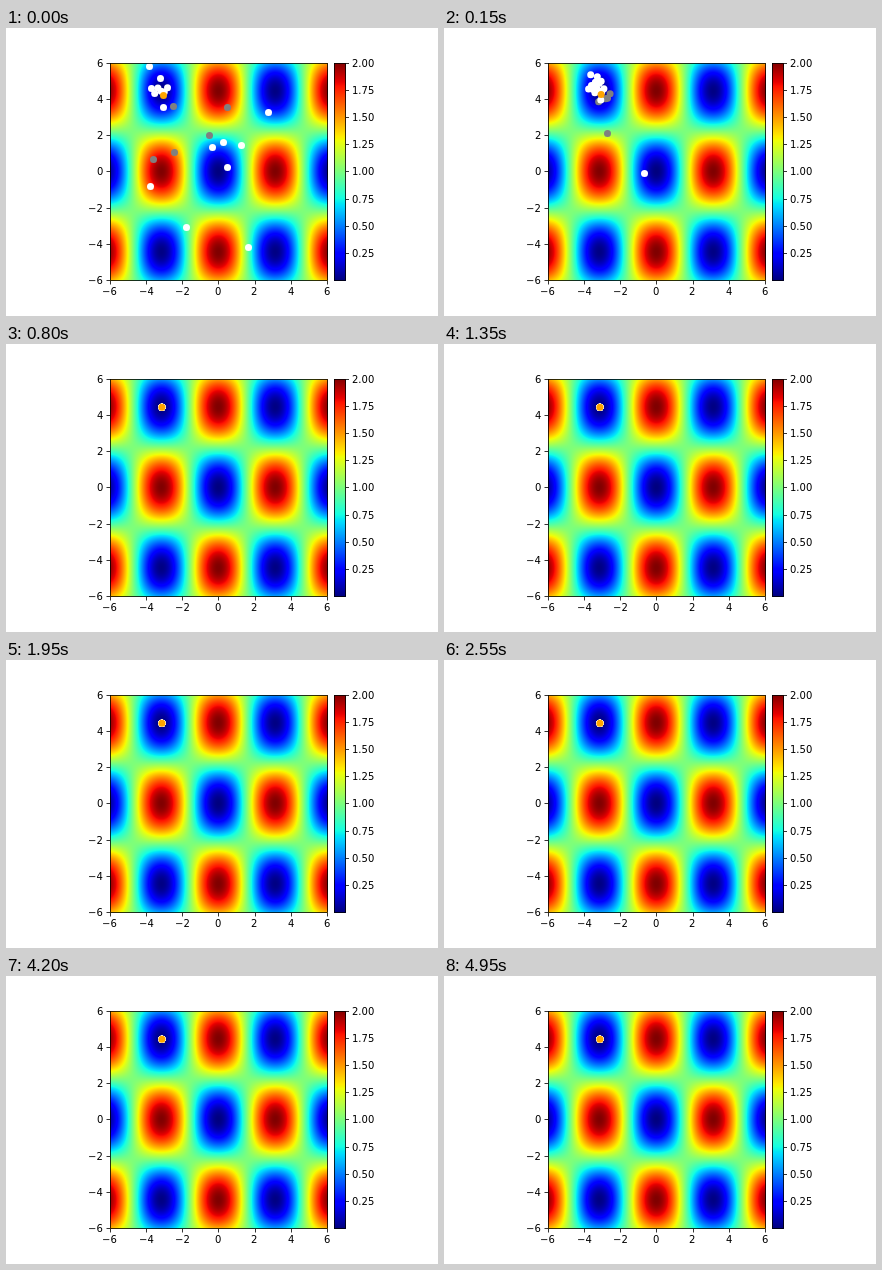
Recreate the animation shown at these times as an HTML page with a canvas. Size 432 px wide and 288 px high, loop 5000 ms.

```html
<!DOCTYPE html>
<html lang="en">
<head>
<meta charset="utf-8">
<title>Swarm search</title>
<style>
html, body { margin: 0; width: 100%; height: 100%; overflow: hidden; background: #fff; }
canvas { display: block; }
</style>
</head>
<body>
<canvas id="stage" width="432" height="288"></canvas>
<script>
const LOOP = 5000, STEP = 50, LAST = 16;
const SIZE = 217.44, UNIT = SIZE / 12, LEFT = 103.64, BASE = 252, TOP = 2.003;
const BOX = { x: 104, y: 35, w: 217, h: 217 };
const BAR = { x: 328, y: 35, w: 11, h: 217 };
const px = x => LEFT + (x + 6) * UNIT;
const py = y => BASE - (y + 6) * UNIT;
const barY = v => BASE - v / TOP * SIZE;
const GOAL = [px(-Math.PI), py(Math.PI * Math.SQRT2)];

// Starting points, grouped by how the agents travel.
const greys = [[167, 78], [221, 79], [203, 107], [147, 131]];
const far = [
  [262, 84], [206, 119], [217, 114], [235, 117],
  [144, 158], [180, 199], [242, 219]
];
const near = [[143, 38], [154, 50], [157, 79]];
for (let i = 0; i < 6; i++) near.push([145 + 3.2 * i, 62 + 3 * Math.sin(2.4 * i - 0.7)]);
const lateGrey = { from: [168, 124], via: [163, 105] };
const lateWhite = { from: [221, 139], via: [200, 145] };

const makeCanvas = () => Object.assign(document.createElement('canvas'), { width: 432, height: 288 });
const ctx = document.getElementById('stage').getContext('2d');
const plot = makeCanvas();
const pc = plot.getContext('2d');

const clamp = v => Math.min(1, Math.max(0, v));
const mix = (a, b, k) => a.map((v, i) => v + (b[i] - v) * k);

// Rises from a to b, stays full until c, falls to zero at d.
const hump = (v, a, b, c, d) => 255 * clamp(Math.min((v - a) / (b - a), (d - v) / (d - c)));
const jet = v => [
  hump(v, 0.35, 0.66, 0.89, 1.11),
  hump(v, 0.125, 0.375, 0.64, 0.91),
  hump(v, -0.11, 0.11, 0.34, 0.65)
];

const surface = (x, y) =>
  1 + (x * x + y * y) / 4000 - Math.cos(x) * Math.cos(y / Math.SQRT2);

function shade({ x: left, y: top, w, h }, value) {
  const img = pc.createImageData(w + 1, h + 1);
  let i = 0;
  for (let y = 0; y <= h; y++) {
    for (let x = 0; x <= w; x++) {
      const v = value(left + x + 0.5, top + y + 0.5) / TOP;
      for (const c of [...jet(clamp(v)), 255]) img.data[i++] = c;
    }
  }
  pc.putImageData(img, left, top);
}

function frame(c, { x, y, w, h }) {
  c.strokeStyle = '#000';
  c.lineWidth = 0.8;
  c.strokeRect(x + 0.5, y + 0.5, w, h);
}

function line(x1, y1, x2, y2) {
  pc.beginPath();
  pc.moveTo(x1, y1);
  pc.lineTo(x2, y2);
  pc.stroke();
}

// anchor: 0 left, 0.5 centre, 1 right; glyphs start on whole pixels.
function label(text, x, y, anchor) {
  pc.fillText(text, Math.round(x - pc.measureText(text).width * anchor), y);
}

function drawPlot() {
  pc.fillStyle = '#fff';
  pc.fillRect(0, 0, 432, 288);
  shade(BOX, (x, y) => surface((x - LEFT) / UNIT - 6, (BASE - y) / UNIT - 6));
  shade(BAR, (x, y) => (BASE - y) / SIZE * TOP);
  frame(pc, BAR);

  pc.fillStyle = '#000';
  pc.font = '10px "DejaVu Sans", sans-serif';
  for (let v = -6; v <= 6; v += 2) {
    const x = Math.round(px(v)) + 0.5, y = Math.round(py(v)) + 0.5;
    const text = String(v).replace('-', '\u2212');
    line(x, 253, x, 256.5);
    label(text, px(v), 267, 0.5);
    line(100.5, y, 104, y);
    label(text, 97, y + 3.5, 1);
  }
  for (let v = 0.25; v <= 2; v += 0.25) {
    const y = Math.round(barY(v)) + 0.5;
    line(340, y, 343, y);
    label(v.toFixed(2), 346, y + 3.5, 0);
  }
}

const toGoal = (p, k) => mix(GOAL, p, k);
const glide = (p, s) => {
  const lag = 2.5 + 2 * Math.exp(-Math.hypot(p[0] - GOAL[0], p[1] - GOAL[1]) / 20);
  return toGoal(p, Math.exp(-((s / lag) ** 4)));
};
const swing = (p, s) => toGoal(p, Math.exp(-s / 2.2) * Math.cos(s * 2 / 3));
const detour = ({ from, via }, s) =>
  s < 3 ? mix(from, via, s / 3) : toGoal(via, Math.exp((3 - s) / 1.7));

function dots(agents, path, color, step) {
  ctx.fillStyle = color;
  for (const agent of agents) {
    const [x, y] = path(agent, step);
    ctx.beginPath();
    ctx.arc(x + 0.5, y + 0.5, 3.5, 0, Math.PI * 2);
    ctx.fill();
  }
}

function draw(time) {
  const step = Math.min(LAST, Math.floor((time % LOOP) / STEP));
  ctx.drawImage(plot, 0, 0);
  ctx.save();
  ctx.beginPath();
  ctx.rect(BOX.x, BOX.y, BOX.w + 1, BOX.h + 1);
  ctx.clip();
  dots(greys, glide, '#808080', step);
  dots([lateGrey], detour, '#808080', step);
  dots(near, glide, '#fff', step);
  dots(far, swing, '#fff', step);
  dots([lateWhite], detour, '#fff', step);
  dots([[157, 67]], glide, '#ffa500', step);
  ctx.restore();
  frame(ctx, BOX);
}

drawPlot();
const start = performance.now();
function tick() {
  draw(performance.now() - start);
  requestAnimationFrame(tick);
}
tick();
</script>
</body>
</html>
```
